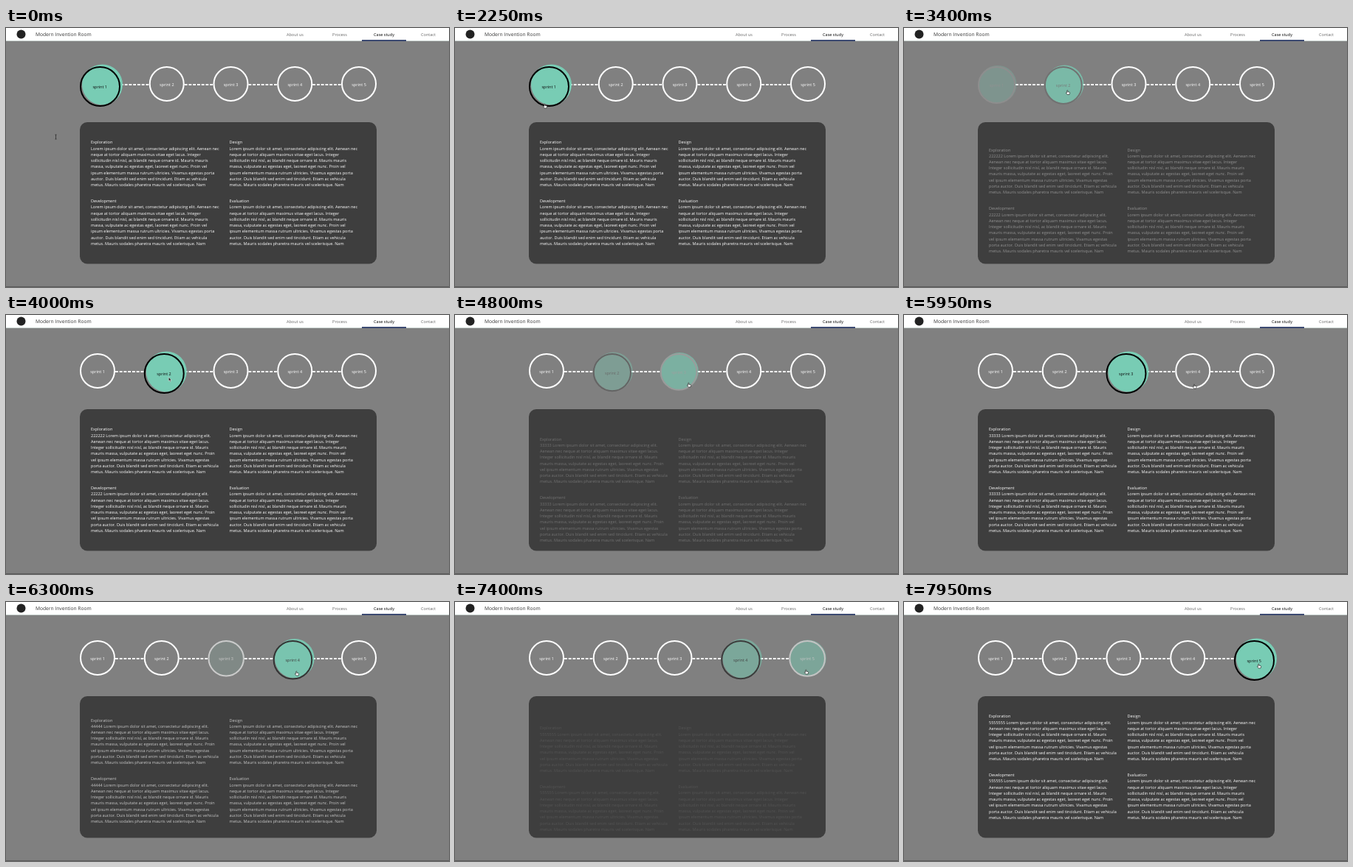
Recreate the animation shown at these times as an HTML page. Size 600x352 px, loop 8000 ms.

```html
<!DOCTYPE html>
<html lang="en">
<head>
<meta charset="utf-8">
<title>Case study</title>
<style>
html, body { margin: 0; width: 100%; height: 100%; overflow: hidden; background: #808080; }
svg { display: block; width: 600px; height: 352px; }
text { font: 5.53px "Open Sans", sans-serif; text-rendering: geometricPrecision; white-space: pre; }
.mid { text-anchor: middle; }
</style>
</head>
<body>
<svg viewBox="0 0 600 352">
  <rect width="600" height="17" fill="#fff"/>
  <rect y="17" width="600" height="1" fill="#c6d0cd"/>
  <rect y="351" width="600" height="1" fill="#5c5c5c"/>
  <circle cx="20.5" cy="8.5" r="6" fill="#222"/>
  <text x="40" y="11.2" fill="#333" style="font-size:6.66px">Modern Invention Room</text>
  <g class="mid" fill="#666">
    <text x="391.5" y="10.7">About us</text>
    <text x="452" y="10.7">Process</text>
    <text x="512" y="10.7" fill="#000">Case study</text>
    <text x="572" y="10.7">Contact</text>
  </g>
  <rect x="482" y="16" width="60" height="2" fill="#3c4a72"/>
  <rect x="100" y="128" width="402" height="192.5" rx="10" fill="#3e3e3e"/>
  <g id="steps"></g>
  <g id="copy" fill="#fff"></g>
  <g id="cursor"></g>
</svg>
<script>
const LOOP = 8000, LEFT = 100, WIDTH = 402, TOP = 52, LINE = 8.24;
const $ = id => document.getElementById(id);
const clicks = [3214, 4660, 6014, 7300];
const tail = "|metus. Mauris sodales pharetra mauris vel scelerisque. Nam";
const plain = ("Lorem ipsum dolor sit amet, consectetur adipiscing elit. Aenean nec|" +
  "neque at tortor aliquam maximus vitae eget lacus. Integer|" +
  "sollicitudin nisl nisl, ac blandit neque ornare id. Mauris mauris|" +
  "massa, vulputate ac egestas eget, laoreet eget nunc. Proin vel|" +
  "ipsum elementum massa rutrum ultricies. Vivamus egestas porta|" +
  "auctor. Duis blandit sed enim sed tincidunt. Etiam ac vehicula" + tail).split("|");
const numbered = ("Lorem ipsum dolor sit amet, consectetur adipiscing elit.|" +
  "Aenean nec neque at tortor aliquam maximus vitae eget lacus.|" +
  "Integer sollicitudin nisl nisl, ac blandit neque ornare id. Mauris|" +
  "mauris massa, vulputate ac egestas eget, laoreet eget nunc. Proin|" +
  "vel ipsum elementum massa rutrum ultricies. Vivamus egestas|" +
  "porta auctor. Duis blandit sed enim sed tincidunt. Etiam ac vehicula" + tail).split("|");
const digits = [["", ""], ["222222", "22222"], ["33333", "33333"], ["44444", "44444"], ["5555555", "555555"]];

// time, x, y of the pointer
const path = [
  [50, 67.5, 148], [300, 147, 100], [500, 122, 80.5], [1150, 122, 80.5], [1300, 106, 72],
  [1400, 130, 56], [1500, 147, 80], [1600, 130, 96], [1950, 130, 96], [2100, 98, 124],
  [2250, 122, 106], [2450, 140, 72], [2700, 140, 72], [3180, 222, 87.5], [4150, 222, 87.5],
  [4620, 317, 95], [5500, 317, 95], [5970, 394, 97], [6800, 394, 97], [7250, 476, 95],
  [7650, 476, 95], [7900, 481, 87], [LOOP, 481, 87]];

const clamp = v => Math.min(1, Math.max(0, v));
const mix = (a, b, p) => a + (b - a) * p;
const smooth = p => p * p * (3 - 2 * p);
const grey = v => `rgb(${v},${v},${v})`;

// cubic-bezier(.25, .1, .25, 1)
function ease(x) {
  x = clamp(x);
  let lo = 0, hi = 1, s;
  const bez = (a, b) => 3 * (1 - s) ** 2 * s * a + 3 * (1 - s) * s * s * b + s ** 3;
  for (let i = 0; i < 20; i++) {
    s = (lo + hi) / 2;
    if (bez(.25, .25) < x) lo = s; else hi = s;
  }
  return bez(.1, 1);
}

function drawSteps(step, p) {
  const weight = [0, 1, 2, 3, 4].map(i => i === step ? p : i === step - 1 ? 1 - p : 0);
  const tint = i => i === step ? Math.sqrt(p) : i === step - 1 ? 1 - Math.sqrt(p) : 0;
  const sizes = weight.map(w => mix(48, 55, w));
  const gap = (WIDTH - sizes.reduce((a, b) => a + b)) / 4;
  let x = LEFT, lines = "", discs = "";
  sizes.forEach((d, i) => {
    const w = weight[i], cx = x + d / 2, cy = TOP + d / 2;
    if (i < 4) lines += `<path d="M${x + d} 77h${gap}" stroke="#fff" stroke-width="1.8" stroke-dasharray="3.8 1.95"/>`;
    discs += `<circle cx="${cx + 3 * w}" cy="${cy - 2.5 * w}" r="${d / 2}" fill="#78ccb4" opacity="${tint(i)}"/>
      <circle cx="${cx}" cy="${cy}" r="${d / 2 - 1}" fill="none" stroke="${grey(mix(255, 0, w))}" stroke-width="2"/>
      <text class="mid" x="${cx - .3 * w}" y="${cy + 2.6 - .3 * w}" fill="${grey(mix(255, 10, w))}">sprint ${i + 1}</text>`;
    x += d + gap;
  });
  $("steps").innerHTML = lines + discs;
}

function block(x, y, title, lines) {
  return [title, ...lines].map((s, i) => `<text x="${x}" y="${y + i * LINE}">${s}</text>`).join("");
}

function fillCopy(step) {
  const left = n => step ? numbered.map((s, i) => i ? s : digits[step][n] + " " + s) : plain;
  $("copy").innerHTML =
    block(115, 157.3, "Exploration", left(0)) + block(302.5, 157.3, "Design", plain) +
    block(115, 237.1, "Development", left(1)) + block(302.5, 237.1, "Evaluation", plain);
}

function drawCursor(t) {
  const n = path.findIndex(k => k[0] > t);
  const b = path[n], a = path[Math.max(0, n - 1)];
  const p = a === b ? 0 : smooth((t - a[0]) / (b[0] - a[0]));
  const x = mix(a[1], b[1], p), y = mix(a[2], b[2], p);
  const near = [127, 214, 301, 387, 474].some(cx => Math.hypot(x - cx, y - 79) < 29);
  const arrow = !near || (t >= 850 && t < 900) || (t >= 4000 && t < 4150);
  const shape = t < 100
    ? `<path d="M-1-3H1M0-3V3M-1 3H1" fill="none" stroke="#222" stroke-width=".7"/>`
    : arrow
    ? `<path d="M-1.7-3V2.2L-.5 1.2L.4 3.2L1.3 2.8L.5.9H2Z" fill="#111" stroke="#fff" stroke-width=".5"/>`
    : `<path d="M-1.2.5V-2.6Q-.7-3.3-.2-2.6V-.8L2.2-.3Q2.8 0 2.6.9L2 3H-.9L-2.7.6Q-2.4-.3-1.2.5Z" fill="#fff" stroke="#111" stroke-width=".6"/>`;
  $("cursor").innerHTML = `<g transform="translate(${x} ${y})">${shape}</g>`;
}

let shown = -1;
function frame(now) {
  const t = now % LOOP;
  const step = clicks.filter(c => c <= t).length;
  const since = step ? t - clicks[step - 1] : LOOP;
  if (step !== shown) fillCopy(shown = step);
  drawSteps(step, ease(since / 580));
  const p = ease(since / 650);
  $("copy").setAttribute("transform", `translate(0 ${20 * (1 - p)})`);
  $("copy").setAttribute("opacity", clamp((p - .1) / .9));
  drawCursor(t);
  requestAnimationFrame(frame);
}
const start = performance.now();
const tick = requestAnimationFrame;
frame(0);
</script>
</body>
</html>
```
